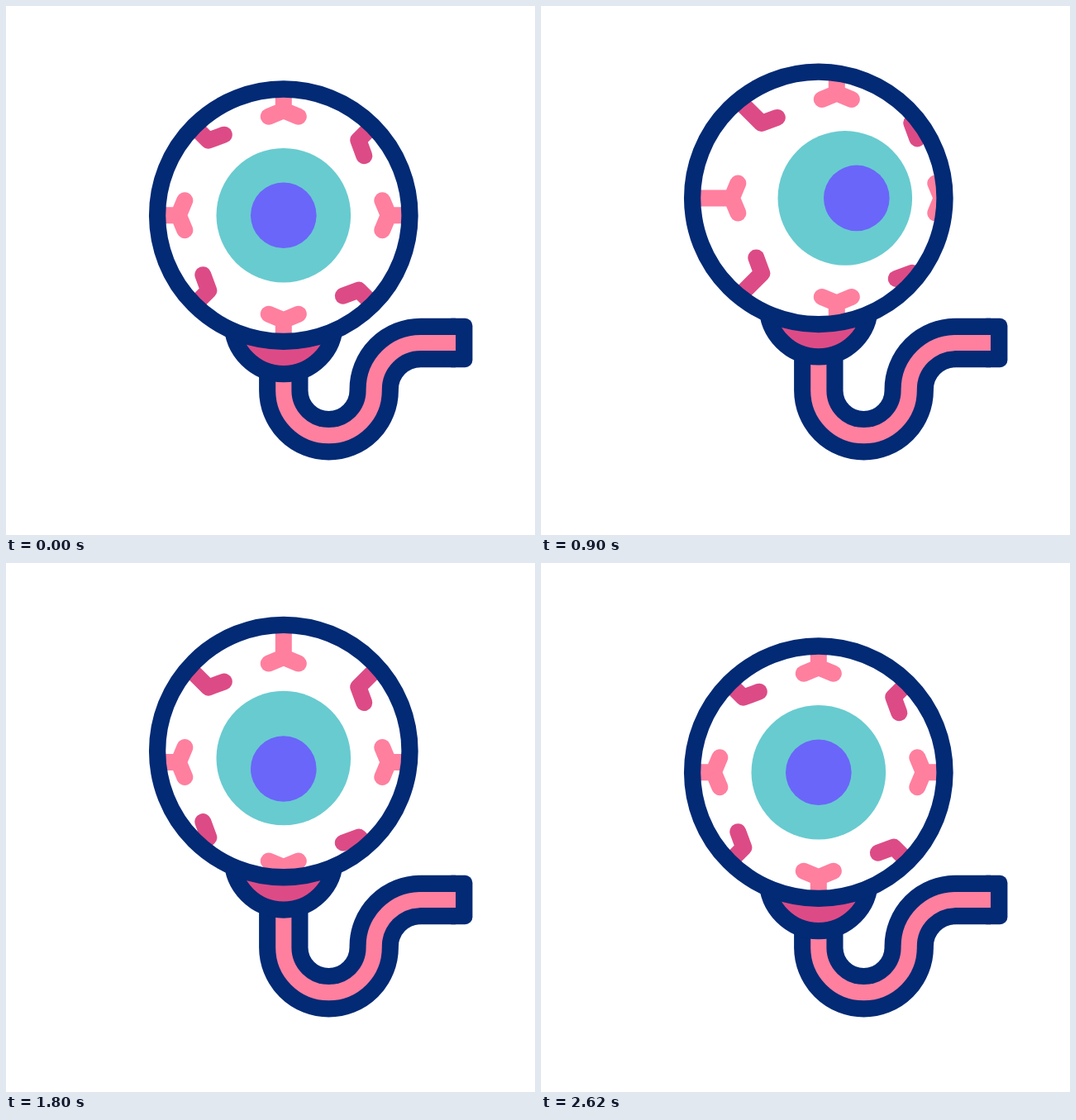
Animation, 640 px wide and 640 px high, one loop 3 s. Source, as an HTML page:

```html
<!DOCTYPE html>
<html lang="en">
<head>
<meta charset="utf-8">
<title>Eyeball</title>
<style>
  html, body { margin: 0; width: 100%; height: 100%; overflow: hidden; background: #fff; }
  svg { display: block; width: 100%; height: 100%; }
  .line { fill: none; stroke-linejoin: round; }
  .navy { stroke: #022a75; }
  .pink { stroke: #ff7f9f; }
  .dark { stroke: #dd4b86; }
  .vein { stroke-width: 20; stroke-linecap: round; }
</style>
</head>
<body>
<svg viewBox="0 0 640 640">
  <defs>
    <clipPath id="ball"><circle r="148"/></clipPath>
    <path id="cord" d="M335.8 370V465A54.7 54.7 0 0 0 445.2 465V464A56.5 56.5 0 0 1 501.7 407.5H544"/>
    <g id="veinPair" class="line vein">
      <path class="pink" d="M0 -165V-127M-18 -119.5L0 -127L18 -119.5"/>
      <path class="dark" d="M-72 -97.5L-91 -90.5L-126 -125.5"/>
    </g>
  </defs>

  <use href="#cord" class="line navy" stroke-width="59.4"/>
  <rect x="530" y="377.8" width="34.4" height="59.4" rx="9" fill="#022a75"/>
  <use href="#cord" class="line pink" stroke-width="19.2"/>

  <g id="eye">
    <circle class="navy" cy="130" r="62" fill="#dd4b86" stroke-width="20.3"/>
    <circle r="150" fill="#fff"/>
    <g clip-path="url(#ball)">
      <g id="veins">
        <use href="#veinPair"/>
        <use href="#veinPair" transform="rotate(90)"/>
        <use href="#veinPair" transform="rotate(180)"/>
        <use href="#veinPair" transform="rotate(270)"/>
      </g>
      <circle id="iris" r="81.3" fill="#68cbd0"/>
      <circle id="pupil" r="39.8" fill="#6a66f9"/>
    </g>
    <circle class="line navy" r="152.7" stroke-width="20.3"/>
  </g>
</svg>
<script>
const LOOP = 3000;
const CENTER = { x: 335.8, y: 253.2 };

// CSS-style cubic-bezier easing, solved by bisection.
function bezier(x1, y1, x2, y2) {
  const curve = (a, b, s) => 3 * a * s * (1 - s) ** 2 + 3 * b * s * s * (1 - s) + s ** 3;
  return u => {
    let low = 0, high = 1;
    for (let i = 0; i < 24; i++) {
      const mid = (low + high) / 2;
      if (curve(x1, x2, mid) < u) low = mid; else high = mid;
    }
    return curve(y1, y2, low);
  };
}
const inOut = bezier(0.65, 0, 0.35, 1);
const floatUp = bezier(0.18, 0, 0.05, 0.87);

// A motion rests at 0 until `start`, then eases through its moves.
function motion(start, ...moves) {
  return t => {
    let from = 0, begin = start;
    for (const { to, end, ease = inOut } of moves) {
      if (t < end) return from + (to - from) * ease(Math.max(0, t - begin) / (end - begin));
      from = to;
      begin = end;
    }
    return from;
  };
}

const bounce = motion(200,
  { to: 10, end: 400 },
  { to: -33, end: 1690, ease: floatUp },
  { to: 11, end: 2010 },
  { to: -12, end: 2290 },
  { to: 0, end: 2600 });

// Each layer of the eye glances right, left, down and up by its own reach.
const glance = (id, { right, left, dip, lift, down, up }) => ({
  node: document.getElementById(id),
  x: motion(270,
    { to: right, end: 890 },
    { to: right, end: 910 },
    { to: -left, end: 1400 },
    { to: 0, end: 1790 }),
  y: motion(220,
    { to: dip, end: 580 },
    { to: 0, end: 900 },
    { to: -lift, end: 1380 },
    { to: down, end: 1800 },
    { to: -up, end: 2080 },
    { to: 0, end: 2600 })
});
const layers = [
  glance("veins", { right: 22, left: 14.5, dip: 9, lift: -5, down: 13.5, up: 12 }),
  glance("iris", { right: 32, left: 14, dip: 9.5, lift: 5.5, down: 8.5, up: 11 }),
  glance("pupil", { right: 46, left: 24.5, dip: 17, lift: 8.5, down: 21.5, up: 13.5 })
];
const eye = document.getElementById("eye");

function place(node, x, y) {
  node.setAttribute("transform", `translate(${x.toFixed(2)} ${y.toFixed(2)})`);
}

function draw(t) {
  place(eye, CENTER.x, CENTER.y + bounce(t));
  for (const { node, x, y } of layers) place(node, x(t), y(t));
}

const start = performance.now();
function tick() {
  draw((performance.now() - start) % LOOP);
  requestAnimationFrame(tick);
}
draw(0);
requestAnimationFrame(tick);
</script>
</body>
</html>
```
